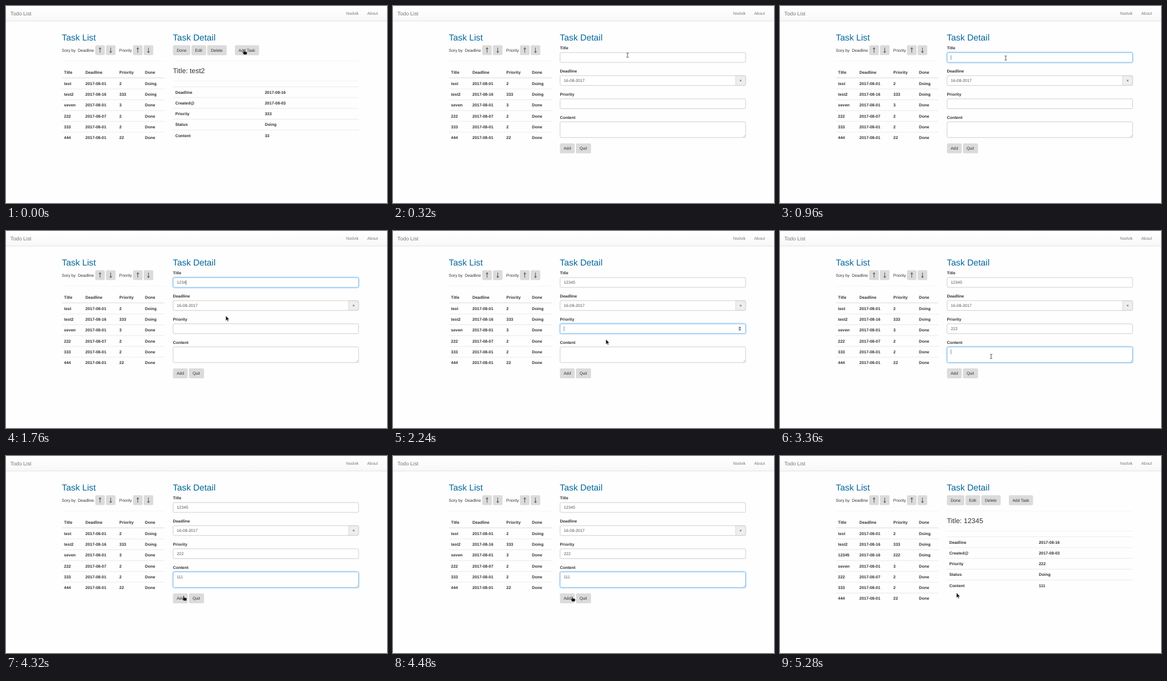
These frames come from a looping animation (606 by 314 pixels, 5440 ms). An HTML page:

```html
<!DOCTYPE html>
<html lang="en">
<head>
<meta charset="utf-8">
<title>Todo List</title>
<style>
  html, body { margin: 0; width: 100%; height: 100%; overflow: hidden; background: #fefefe; }
  svg { display: block; width: 606px; height: 314px; }
  text { font: 6.5px "Liberation Sans", Arial, sans-serif; fill: #333; text-rendering: geometricPrecision; white-space: pre; }
  .b { font-weight: bold; }
  .h2 { font-size: 13.9px; fill: #069; }
  .h3 { font-size: 11.1px; }
  .brand { font-size: 8.35px; fill: #777; }
  .link { fill: #777; }
  .val { fill: #555; }
  .btn { fill: #dbdbdb; }
  .field { fill: #fff; stroke: #c6c6c6; stroke-width: .8; }
  .field.on { stroke: #66afe9; filter: drop-shadow(0 0 1.4px rgba(102, 175, 233, .6)); }
  .caret { stroke: #444; stroke-width: .6; }
  .hide { display: none; }
</style>
</head>
<body>
<svg id="stage" viewBox="0 0 606 314"></svg>
<script>
const TICK = 160, TICKS = 34;
const L = 265.5, R = 561, ROW = 17.23;

const text = (x, y, s, cls = "", id = "") => `<text x="${x}" y="${y}" class="${cls}" id="${id}">${s}</text>`;
const rule = (x1, x2, y, color = "#ddd", w = .6) =>
  `<path d="M${x1} ${y}H${x2}" stroke="${color}" stroke-width="${w}"/>`;
const box = (x, y, w, h, cls, id = "") =>
  `<rect x="${x}" y="${y}" width="${w}" height="${h}" rx="1.9" class="${cls}" id="${id}"/>`;
const button = (x, y, w, s, tx) => box(x, y, w, 15.8, "btn") + text(tx, y + 10.3, s);
const group = (id, body) => `<g id="${id}">${body}</g>`;

function arrowButton(x, dir) {
  const cx = x + 7.6;
  const tip = 70.4 - 4 * dir, tail = 70.4 + 4 * dir, wing = tip + 2.4 * dir;
  return box(x, 62.4, 15.2, 15.8, "btn") +
    `<path d="M${cx} ${tail}V${tip}M${cx - 1.7} ${wing}L${cx} ${tip}L${cx + 1.7} ${wing}" fill="none" stroke="#333" stroke-width=".75"/>`;
}

function taskRows(tasks) {
  return tasks.map((cells, i) => {
    const y = 125.9 + i * ROW;
    return (i ? rule(89, 252, y - 10.9) : "") +
      cells.map((c, k) => text([92.3, 126.3, 180.3, 221][k], y, c, "b")).join("");
  }).join("");
}

function detail(title, priority, content) {
  const rows = [["Deadline", "2017-08-16"], ["Created@", "2017-08-03"],
    ["Priority", priority], ["Status", "Doing"], ["Content", content]];
  return button(L, 62.6, 27.6, "Done", 271.6) + button(295, 62.6, 23.3, "Edit", 300.8) +
    button(320, 62.6, 31, "Delete", 325.9) + button(364, 62.6, 38.5, "Add Task", 369.7) +
    rule(L, R, 87.7, "#eee") + text(L, 107.2, "Title: " + title, "h3") + rule(L, R, 119.5, "#eee") +
    rows.map(([k, v], i) => {
      const y = 139.8 + i * ROW;
      return rule(L, R, y - 11) + text(269.2, y, k, "b") + text(411.7, y, v, "b");
    }).join("");
}

function field(name, label, y, h = 15.7) {
  return text(L, y - 4.8, label, "b") + box(L + .3, y, R - L - .5, h, "field", name + "Box") +
    text(271.7, y + 10.2, "", "val", name) +
    `<path class="caret hide" id="${name}Caret" d="M0 ${y + 4.2}v7.6"/>`;
}

const form =
  field("title", "Title", 74.2) + field("deadline", "Deadline", 111) +
  `<path d="M545 111.3H559.2a1.7 1.7 0 0 1 1.6 1.7v11.8a1.7 1.7 0 0 1 -1.6 1.6H545z" fill="#eee" stroke="#c6c6c6" stroke-width=".6"/>` +
  text(551.1, 121.1, "×") +
  field("priority", "Priority", 147.9) + field("content", "Content", 184.7, 25) +
  group("spinner", `<rect x="548.7" y="151.6" width="5.8" height="8.3" rx=".8" fill="#ededed"/>
    <path d="M549.9 155l1.7-2.2 1.7 2.2zM549.9 156.6l1.7 2.2 1.7-2.2z" fill="#444"/>`) +
  `<path d="M557 208.8l3-3M558.7 208.8l1.3-1.3" stroke="#999" stroke-width=".5"/>` +
  button(L, 219, 23.5, "Add", 271.5) + button(291, 219, 24, "Quit", 296.7);

const tasks = [
  ["test", "2017-08-01", "2", "Doing"], ["test2", "2017-08-16", "333", "Doing"],
  ["seven", "2017-08-01", "3", "Done"], ["222", "2017-08-07", "2", "Done"],
  ["333", "2017-08-01", "2", "Done"], ["444", "2017-08-01", "22", "Done"]];
const added = ["12345", "2017-08-16", "222", "Doing"];

// each pointer has its hot spot at the origin
const pointers =
  group("arrow", `<path d="M0 0V8L1.9 6.4 3.2 9.2 4.6 8.6 3.3 5.9H5.8z" fill="#111" stroke="#fff" stroke-width=".5"/>`) +
  group("hand", `<path d="M-.9 .3Q0-.5 .8 .4V3L2 2.9 3.2 3.2 4.3 3.6Q5.2 3.9 5 5L4.4 8H-.4L-1.2 6.3-2.9 4.2Q-2.6 3.2-1.7 3.9L-.9 4.5z" fill="#111" stroke="#fff" stroke-width=".4"/>`) +
  group("beam", `<path d="M-1.8-3.3H-.5L0-2.9 .5-3.3H1.8M0-2.9V2.9M-1.8 3.3H-.5L0 2.9 .5 3.3H1.8" fill="none" stroke="#333" stroke-width=".8"/>`);

const $ = id => document.getElementById(id);
$("stage").innerHTML =
  `<defs><linearGradient id="bar" x2="0" y2="1"><stop stop-color="#fff"/><stop offset="1" stop-color="#f8f8f8"/></linearGradient>
   <linearGradient id="shade" x2="0" y2="1"><stop stop-color="#000" stop-opacity=".05"/><stop offset="1" stop-color="#000" stop-opacity="0"/></linearGradient></defs>
   <rect width="606" height="23.6" fill="url(#bar)"/><rect y="23.6" width="606" height="2.6" fill="url(#shade)"/>` +
  rule(0, 606, 23.5, "#e2e2e2") +
  text(7, 14.8, "Todo List", "brand") + text(541, 14.2, "Nodvik", "link") + text(574.5, 14.2, "About", "link") +
  text(88.8, 55.1, "Task List", "h2") + text(265.3, 55.1, "Task Detail", "h2") +
  text(88.8, 72.5, "Sory by") + text(114.3, 72.5, "Deadline") + text(180, 72.5, "Priority") +
  arrowButton(142, 1) + arrowButton(159, -1) + arrowButton(202, 1) + arrowButton(219, -1) +
  rule(89, 252, 87.7, "#eee") +
  ["Title", "Deadline", "Priority", "Done"].map((s, i) => text([92.3, 126.3, 180.3, 221][i], 108.1, s, "b")).join("") +
  rule(89, 252, 114.6, "#ddd", .95) +
  group("listOld", taskRows(tasks)) +
  group("listNew", taskRows([...tasks.slice(0, 2), added, ...tasks.slice(2)])) +
  group("before", detail("test2", "333", "33")) + group("form", form) +
  group("after", detail("12345", "222", "111")) + group("pointer", pointers);

$("deadline").textContent = "16-08-2017";

// [tick, changes]; later entries build on earlier ones
const script = [
  [0, { view: "before", at: ["hand", 378.5, 69.6], focus: "", caret: true, title: "", priority: "", content: "" }],
  [1, { view: "form" }],
  [2, { at: ["beam", 373, 78.5] }],
  [3, { at: ["beam", 368, 80.5] }],
  [4, { at: ["beam", 363, 82] }],
  [5, { at: ["beam", 359, 83] }],
  [6, { focus: "title" }],
  [8, { title: "1" }],
  [9, { title: "12", at: ["arrow", 355, 98] }],
  [10, { title: "123", at: ["arrow", 351, 122] }],
  [11, { title: "1234", at: ["arrow", 349.5, 135] }],
  [12, { title: "12345" }],
  [13, { focus: "priority", at: ["beam", 345, 156] }],
  [14, { at: ["arrow", 338.5, 172.5] }],
  [15, { at: ["arrow", 337, 179] }],
  [16, { at: ["arrow", 336, 182] }],
  [17, { priority: "2" }],
  [18, { priority: "22" }],
  [19, { priority: "222" }],
  [20, { at: ["beam", 336, 195] }],
  [21, { focus: "content", at: ["beam", 335.8, 200] }],
  [23, { content: "1" }],
  [24, { content: "11" }],
  [25, { content: "111" }],
  [26, { caret: false, at: ["arrow", 307, 214] }],
  [27, { at: ["hand", 282.7, 222.8] }],
  [28, { at: ["hand", 285, 224] }],
  [29, { view: "after", focus: "" }],
  [31, { at: ["arrow", 287, 222.8] }],
  [33, { at: ["arrow", 280.7, 218] }]
];

const show = (id, on) => $(id).classList.toggle("hide", !on);

function draw(tick) {
  const s = Object.assign({}, ...script.filter(e => e[0] <= tick).map(e => e[1]));
  for (const v of ["before", "form", "after"]) show(v, v === s.view);
  show("listOld", s.view !== "after");
  show("listNew", s.view === "after");
  for (const f of ["title", "priority", "content"]) {
    const on = f === s.focus;
    $(f).textContent = s[f];
    $(f + "Box").classList.toggle("on", on);
    show(f + "Caret", on && s.caret);
    $(f + "Caret").setAttribute("transform", `translate(${272 + s[f].length * 3.615} 0)`);
  }
  show("spinner", s.focus === "priority");
  const [kind, x, y] = s.at;
  for (const p of ["arrow", "hand", "beam"]) show(p, p === kind);
  $("pointer").setAttribute("transform", `translate(${x} ${y})`);
}

let start = null, last = 0;
function loop(now) {
  start ??= now;
  const tick = Math.floor((now - start) / TICK) % TICKS;
  if (tick !== last) draw(last = tick);
  requestAnimationFrame(loop);
}
draw(0);
requestAnimationFrame(loop);
</script>
</body>
</html>
```
